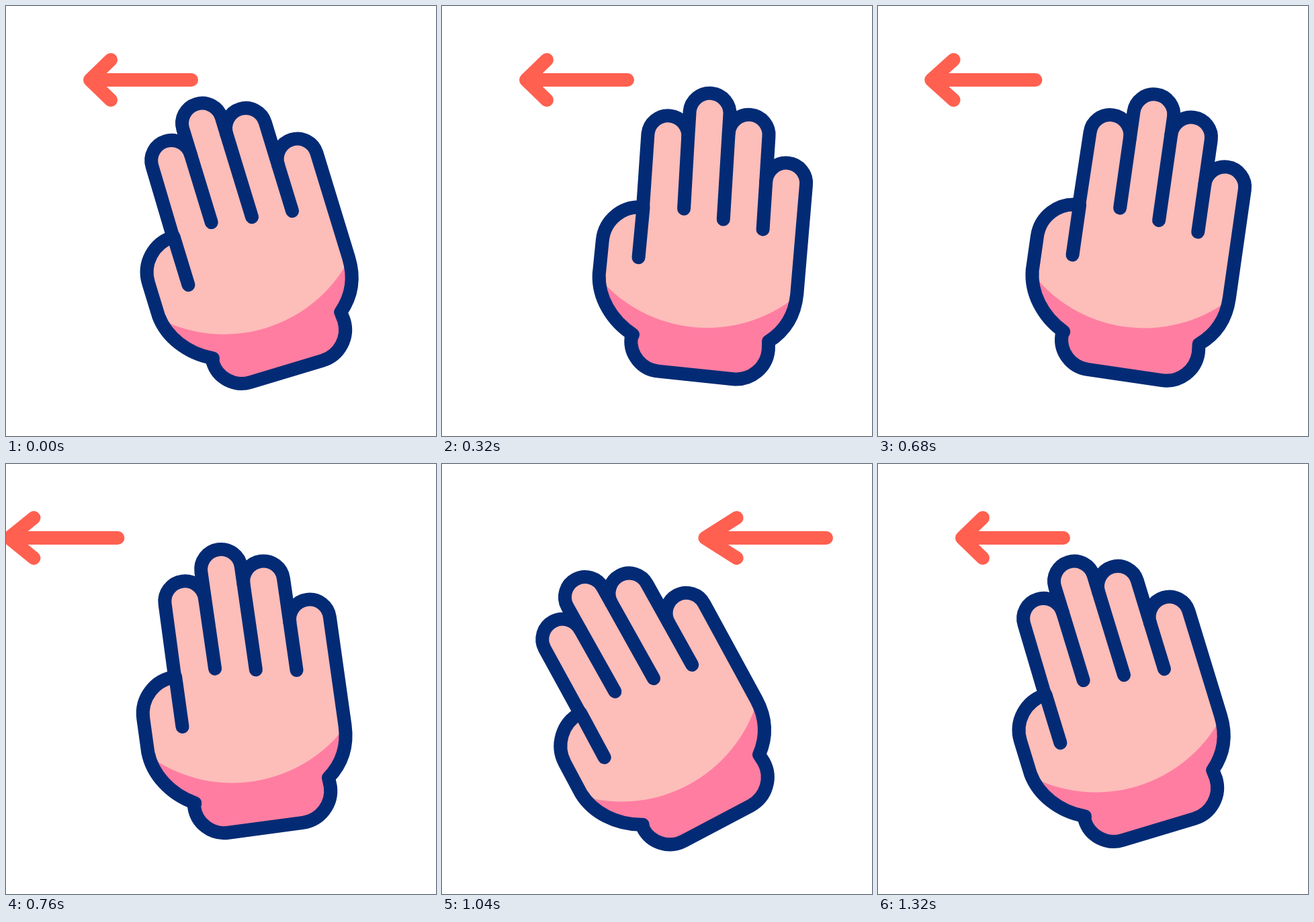
An HTML page with a canvas that plays this animation: 640x640 px, repeating every 1.48 s.

```html
<!DOCTYPE html>
<html lang="en">
<head>
<meta charset="utf-8">
<title>Swipe left</title>
<style>
  html, body { margin: 0; width: 100%; height: 100%; overflow: hidden; background: #fff; }
  canvas { display: block; width: 100vw; height: 100vh; }
</style>
</head>
<body>
<canvas id="stage" width="640" height="640"></canvas>
<script>
const ctx = document.getElementById('stage').getContext('2d');
const LOOP = 1480, STEP = 40;
const NAVY = '#032b75', SKIN = '#fdbdb9', PINK = '#ff7da1', CORAL = '#ff6050';

// Moments of the gesture: wind up, swipe, come back
const WIND = 40, SWIPE = 600, TURN = 920, REST = 1320;
const REST_TILT = -17, WOUND_TILT = 15.4, SWIPED_TILT = -31.2;

// Tip centre and crease end of each finger, index to little finger
const FINGERS = [
  { tip: -240.5, crease: -56 },
  { tip: -280, crease: -135 },
  { tip: -254, crease: -125 },
  { tip: -188, crease: -116 }
];
const fingerX = i => -88 + 60 * i;

const part = (t, from, to) => Math.min(1, Math.max(0, (t - from) / (to - from)));
const smooth = u => u * u * (3 - 2 * u);
const bump = u => 4 * u * (1 - u);
const mix = (a, b, u) => a + (b - a) * u;

function handPose(t) {
  const back = t >= TURN;
  const wind = smooth(part(t, WIND, SWIPE) ** 0.65);
  const swipe = smooth(part(t, SWIPE, TURN));
  const pull = back ? 1 - smooth(part(t, TURN, REST)) : swipe;
  const from = back ? REST_TILT : mix(REST_TILT, WOUND_TILT, wind);
  return {
    tilt: mix(from, SWIPED_TILT, pull),
    x: 3 * bump(wind) - 36 * pull ** 1.3,
    y: 2 * pull - 5 * bump(wind) - 9.5 * bump(swipe),
    lag: -7 * bump(wind) - 6 * pull ** 3
  };
}

function outline(lean) {
  const p = new Path2D();
  p.moveTo(-144, -25);
  p.lineTo(-144, -76);
  p.arc(-89, -76, 55, Math.PI, Math.PI * 1.5);
  FINGERS.forEach(({ tip }, i) => p.arc(fingerX(i) + 30 + lean(tip), tip, 30, Math.PI, 0));
  p.lineTo(152, -25);
  p.bezierCurveTo(152, 5, 141, 30, 117, 49);
  p.lineTo(118, 62);
  p.arc(70, 62, 48, 0, Math.PI / 2);
  p.arc(-42, 64.5, 45, Math.PI / 2, Math.PI);
  p.lineTo(-85, 59);
  p.bezierCurveTo(-120, 41, -142, 8, -144, -25);
  p.closePath();
  return p;
}

function creases(lean) {
  const p = new Path2D();
  FINGERS.forEach(({ tip, crease }, i) => {
    const top = i ? Math.max(tip, FINGERS[i - 1].tip) : -131;
    p.moveTo(fingerX(i) + lean(top), top);
    p.lineTo(fingerX(i), crease);
  });
  return p;
}

function drawHand(t) {
  const { tilt, x, y, lag } = handPose(t);
  const lean = h => lag * Math.max(0, (-120 - h) / 160);
  const shape = outline(lean);
  ctx.save();
  ctx.translate(372 + x, 443 + y);
  ctx.rotate(tilt * Math.PI / 180);

  ctx.save();
  ctx.clip(shape);
  ctx.fillStyle = PINK;
  ctx.fillRect(-200, -340, 400, 480);
  ctx.fillStyle = SKIN;
  ctx.beginPath();
  ctx.arc(3, -172, 211, 0, Math.PI * 2);
  ctx.fill();
  ctx.restore();

  ctx.strokeStyle = NAVY;
  ctx.stroke(shape);
  ctx.stroke(creases(lean));
  ctx.restore();
}

// The head stretches ahead of the tail with the distance from rest
function drawArrow(dx) {
  const far = Math.abs(dx);
  const tip = 125 + dx - 0.1 * far, barb = 156 + dx - 0.045 * far;
  ctx.strokeStyle = CORAL;
  ctx.beginPath();
  ctx.moveTo(276 + dx, 110);
  ctx.lineTo(tip, 110);
  ctx.moveTo(barb, 80);
  ctx.lineTo(tip, 110);
  ctx.lineTo(barb, 140);
  ctx.stroke();
}

function drawArrows(t) {
  const slide = ms => (Math.max(0, ms) / 280) ** 1.4;
  if (t < REST) drawArrow(-240 * slide(t - SWIPE));
  if (t > SWIPE) drawArrow(296 * slide(REST - t));
}

function draw(now) {
  const t = Math.floor((now % LOOP) / STEP) * STEP;
  ctx.fillStyle = '#fff';
  ctx.fillRect(0, 0, 640, 640);
  ctx.lineWidth = 20;
  ctx.lineCap = ctx.lineJoin = 'round';
  drawArrows(t);
  drawHand(t);
}

const start = performance.now();
function tick() {
  draw(performance.now() - start);
  requestAnimationFrame(tick);
}
tick();
</script>
</body>
</html>
```
